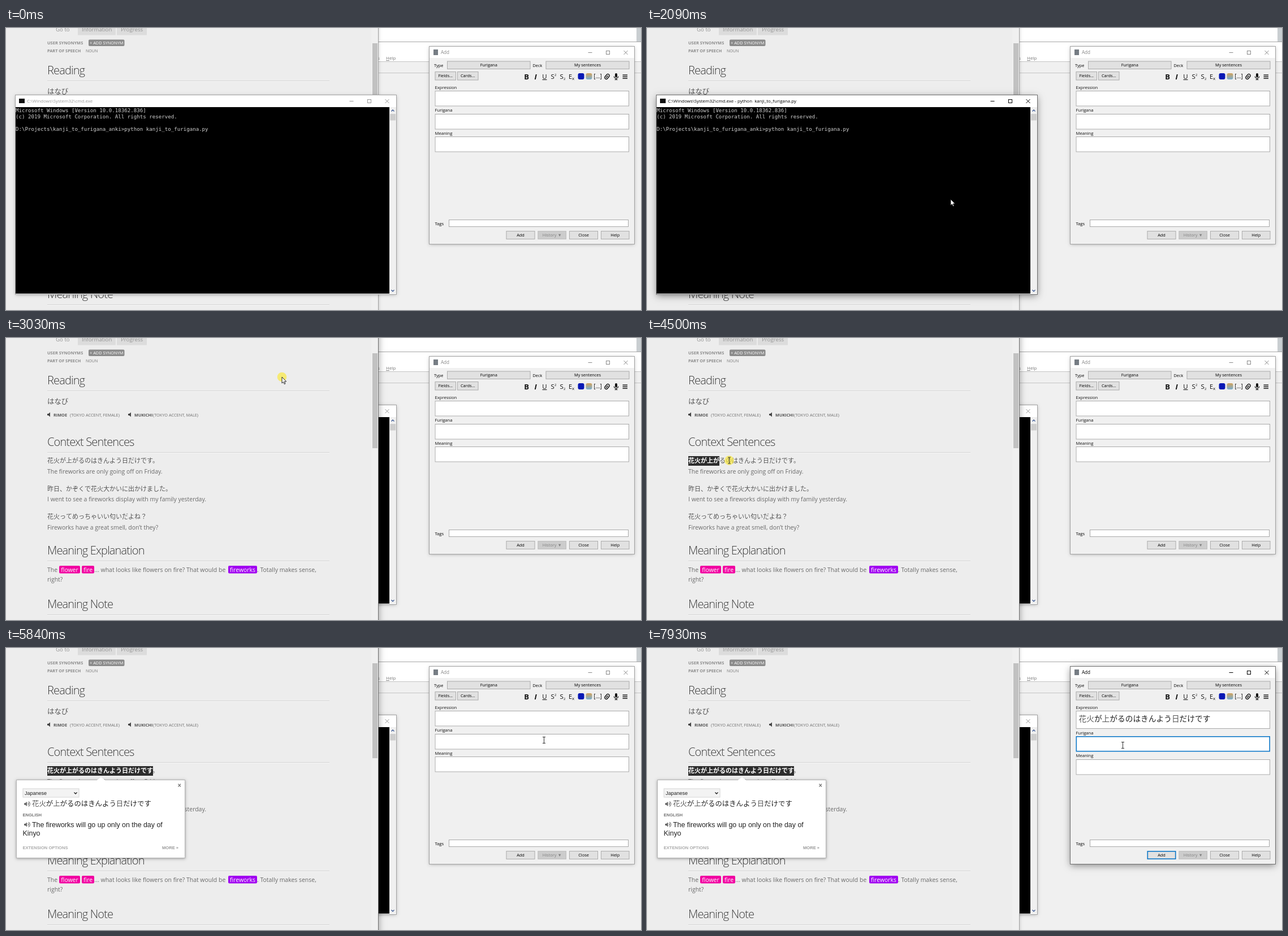
Recreate the animation shown at these times as an HTML page with a canvas. Size 1123 by 499 pixels, loop 8 s.

```html
<!DOCTYPE html>
<html lang="en">
<head>
<meta charset="utf-8">
<title>Adding a card</title>
<style>
html, body { margin: 0; width: 100%; height: 100%; overflow: hidden; background: #f0f0f0; }
canvas { display: block; width: 1123px; height: 499px; }
</style>
</head>
<body>
<canvas id="stage" width="1123" height="499"></canvas>
<script>
const ctx = document.getElementById('stage').getContext('2d');
const LOOP = 8000;
const UI = '"Open Sans", sans-serif';
const ARIAL = '"Liberation Sans", Arial, sans-serif';
const MONO = '"DejaVu Sans Mono", monospace';
const CJK = '"Noto Sans CJK JP", "Noto Sans CJK", sans-serif';
const SENTENCE = '花火が上がるのはきんよう日だけです';
const BLUE = '#0f78c8';

// Cursor path: time, x, y, optional easing
const smooth = u => u * u * (3 - 2 * u);
const easeOut = u => 1 - (1 - u) ** 1.55;
const PATH = [
  [130, 1030, 512], [530, 537, 302], [770, 537, 303], [2320, 537, 303],
  [2490, 537, 304], [2640, 537, 304], [2930, 488, 69], [3200, 488, 69],
  [3640, 150, 256], [4010, 78, 218], [4330, 75, 217], [4970, 259, 216, easeOut],
  [5250, 259, 216], [5590, 928, 177], [5760, 928, 177], [5840, 951, 163],
  [6200, 900, 126], [6840, 900, 126], [7340, 841, 172]
];
const CLICKS = [[530, 610], [3025, 3090], [4330, 5120], [6210, 6300], [7370, 7550]];
const within = (t, a, b) => t >= a && t < b;

function cursorAt(t) {
  let i = PATH.findIndex(k => k[0] > t);
  if (i === 0) return PATH[0].slice(1, 3);
  if (i < 0) return PATH[PATH.length - 1].slice(1, 3);
  const [t0, x0, y0] = PATH[i - 1], [t1, x1, y1, ease = smooth] = PATH[i];
  const u = ease((t - t0) / (t1 - t0));
  return [x0 + (x1 - x0) * u, y0 + (y1 - y0) * u];
}

function rect(x, y, w, h, color) {
  ctx.fillStyle = color;
  ctx.fillRect(x, y, w, h);
}

function box(x, y, w, h, fill, border, line = 1) {
  rect(x, y, w, h, fill);
  ctx.strokeStyle = border;
  ctx.lineWidth = line;
  ctx.strokeRect(x + line / 2, y + line / 2, w - line, h - line);
}

function rounded(x, y, w, h, r, fill) {
  ctx.fillStyle = fill;
  ctx.beginPath();
  ctx.roundRect(x, y, w, h, r);
  ctx.fill();
}

function path(points, color, width = 1) {
  ctx.strokeStyle = color;
  ctx.lineWidth = width;
  ctx.beginPath();
  points.forEach(([x, y]) => ctx.lineTo(x, y));
  ctx.stroke();
}

function polygon(points, fill) {
  ctx.fillStyle = fill;
  ctx.beginPath();
  points.forEach(([x, y]) => ctx.lineTo(x, y));
  ctx.closePath();
  ctx.fill();
}

function text(s, x, y, size, color, { weight = 400, family = UI, align = 'left', spacing = 0 } = {}) {
  ctx.font = `${weight} ${size}px ${family}`;
  ctx.letterSpacing = spacing + 'px';
  ctx.textAlign = align;
  ctx.fillStyle = color;
  ctx.fillText(s, x, y);
}

function japanese(s, x, y, size) {
  [...s].forEach((c, i) => {
    const kanji = /[一-龯]/.test(c);
    text(c, x + i * size, y, size, kanji ? '#555' : '#222', { weight: kanji ? 300 : 400, family: CJK });
  });
}

function windowFrame(x, y, w, h, active) {
  ctx.save();
  ctx.shadowColor = active ? 'rgba(0,0,0,.45)' : 'rgba(0,0,0,.3)';
  ctx.shadowBlur = active ? 12 : 6;
  ctx.shadowOffsetY = active ? 3 : 1;
  rect(x, y, w, h, '#fff');
  ctx.restore();
  ctx.strokeStyle = active ? '#6e6e6e' : '#a2a2a2';
  ctx.lineWidth = 1;
  ctx.strokeRect(x - .5, y - .5, w + 1, h + 1);
}

function titleButtons(x, y, color) {
  rect(x - 3.5, y, 7, 1, color);
  ctx.strokeStyle = color;
  ctx.lineWidth = 1;
  ctx.strokeRect(x + 28.5, y - 2.5, 6, 6);
  path([[x + 59.5, y - 3], [x + 66.5, y + 4]], color);
  path([[x + 66.5, y - 3], [x + 59.5, y + 4]], color);
}

function drawBackdrop() {
  rect(0, 0, 1123, 499, '#f0f0f0');
  rect(658, 0, 457, 24, '#fff');
  rect(1115, 0, 8, 24, '#c9ced1');
  rect(658, 24, 465, 1, '#a6a6a6');
  rect(658, 25, 465, 35, '#fff');
  rect(658, 59, 465, 1, '#c4c4c4');
  rect(658, 79, 465, 1, '#c4c4c4');
  text('s', 657, 56, 8, '#777');
  text('Help', 672, 56, 8, '#777');
  rect(672, 57, 6, 1, '#888');
}

function heading(s, y) {
  text(s, 73, y, 20, '#3a3a3a', { weight: 300, spacing: -.85 });
  rect(73, y + 11, 499, 1, '#d3d3d3');
  rect(73, y + 12, 499, 1, '#f7f7f7');
}

function chip(s, x, w, color) {
  rounded(x, 403, w, 13.5, 2, color);
  text(s, x + w / 2, 413.5, 10.4, '#fff', { align: 'center' });
}

function speaker(x, y, color, waves) {
  polygon([[x, y - 1.5], [x + 2, y - 1.5], [x + 5, y - 4], [x + 5, y + 4], [x + 2, y + 1.5], [x, y + 1.5]], color);
  if (!waves) return;
  ctx.strokeStyle = color;
  ctx.lineWidth = 1.1;
  for (const r of [2.3, 4.8]) {
    ctx.beginPath();
    ctx.arc(x + 5.5, y, r, -1.1, 1.1);
    ctx.stroke();
  }
}

function voice(name, detail, x, detailX) {
  speaker(x, 135.5, '#444');
  text(name, x + 11, 138.5, 7.3, '#555', { weight: 700 });
  text(detail, detailX, 138.5, 7.37, '#707070');
}

function drawSelection(t) {
  if (t < 4330) return;
  const [x] = cursorAt(Math.min(t - 40, 4970));
  const count = Math.max(0, Math.min(17, Math.round((x - 73) / 11)));
  if (!count) return;
  rect(73, 209, count * 11, 17, '#2d2d2d');
  text(SENTENCE.slice(0, count), 73, 221, 11, '#fff', { weight: 700, family: CJK });
}

function drawPopup() {
  ctx.save();
  ctx.shadowColor = 'rgba(0,0,0,.35)';
  ctx.shadowBlur = 5;
  ctx.shadowOffsetY = 1;
  rect(18, 233, 299, 139, '#fff');
  ctx.restore();
  box(18, 233, 299, 139, '#fff', '#b4b4b4');
  polygon([[160, 234.5], [168, 228.5], [176, 234.5]], '#fff');
  path([[304.5, 240.5], [309, 245.5]], '#777', 1.2);
  path([[309, 240.5], [304.5, 245.5]], '#777', 1.2);
  box(29.5, 248.5, 100, 16, '#f3f3f3', '#d8d8d8');
  const arial = { family: ARIAL }, bold = { family: ARIAL, weight: 700 };
  text('Japanese', 33, 260, 9, '#222', arial);
  path([[120.5, 255.5], [123, 258], [125.5, 255.5]], '#222', 1.4);
  speaker(32, 276, '#666', true);
  japanese(SENTENCE, 46, 279.5, 12.4);
  text('ENGLISH', 29.5, 297.5, 7.55, '#777', bold);
  speaker(32, 312.5, '#666', true);
  text('The fireworks will go up only on the day of', 46, 316.5, 12.4, '#222', arial);
  text('Kinyo', 29.5, 332, 12.4, '#222', arial);
  text('EXTENSION OPTIONS', 29.5, 356, 7.58, '#aaa', bold);
  text('MORE »', 305, 356, 7.58, '#999', { ...bold, align: 'right' });
}

function drawPage(t, active) {
  windowFrame(-20, -20, 678, 540, active);
  rect(0, 0, 658, 499, '#ededed');
  rect(646, 0, 12, 499, '#f0f0f0');
  rect(648, 27, 9, 168, '#c1c1c1');

  rect(127, 0, 67, 12.5, '#dcdcdc');
  rect(196, 0, 53, 12.5, '#dcdcdc');
  text('Go to', 88, 6, 9.7, '#929292');
  text('Information', 134, 6, 9.6, '#929292');
  text('Progress', 203, 6, 9.7, '#929292');
  text('USER SYNONYMS', 73, 29, 7.45, '#8c8c8c', { weight: 700 });
  rounded(146, 20.5, 63.5, 11.5, 2, '#8b8b8b');
  text('+ ADD SYNONYM', 148, 29, 7.4, '#fff');
  text('PART OF SPEECH', 73, 43.3, 7.35, '#8c8c8c', { weight: 700 });
  text('NOUN', 141, 43.3, 7.1, '#777');

  heading('Reading', 82);
  text('はなび', 73, 117, 12.4, '#555', { family: CJK });
  voice('RIMOE', '(TOKYO ACCENT, FEMALE)', 73, 113);
  voice('MUKICHI', '(TOKYO ACCENT, MALE)', 216, 260);

  heading('Context Sentences', 191);
  const pairs = [
    [SENTENCE + '。', 'The fireworks are only going off on Friday.'],
    ['昨日、かぞくで花火大かいに出かけました。', 'I went to see a fireworks display with my family yesterday.'],
    ['花火ってめっちゃいい匂いだよね？', 'Fireworks have a great smell, don’t they?']
  ];
  pairs.forEach(([ja, en], i) => {
    const y = 221 + i * 49.6;
    text(ja, 73, y, 11, '#555', { family: CJK });
    text(en, 73, y + 18.8, 10.46, '#6a6a6a');
  });

  heading('Meaning Explanation', 383);
  const body = '#6a6a6a';
  text('The', 73, 413.5, 10.46, body);
  chip('flower', 94, 37, '#f100a1');
  chip('fire', 134, 22, '#f100a1');
  text('... what looks like flowers on fire? That would be', 156.5, 413.5, 10.46, body);
  chip('fireworks', 393, 51, '#a100f1');
  text('. Totally makes sense,', 444, 413.5, 10.46, body);
  text('right?', 73, 430.5, 10.46, body);
  heading('Meaning Note', 478);

  drawSelection(t);
  if (t >= 5265) drawPopup();
}

function drawConsole(t, active) {
  windowFrame(17, 119, 673, 352, active);
  const ink = active ? '#000' : '#999';
  rect(23, 125, 10, 8, '#111');
  const running = t >= 1630 ? ' - python  kanji_to_furigana.py' : '';
  text('C:\\Windows\\System32\\cmd.exe' + running, 37, 132, 7.95, ink);
  titleButtons(611, 129, ink);

  rect(17, 140, 661, 330, '#000');
  const lines = {
    149: 'Microsoft Windows [Version 10.0.18362.836]',
    160: '(c) 2019 Microsoft Corporation. All rights reserved.',
    182: 'D:\\Projects\\kanji_to_furigana_anki>python kanji_to_furigana.py'
  };
  for (const y in lines) text(lines[y], 17, +y, 9.14, '#d0d0d0', { family: MONO });
  if (within(t, 1080, 1560)) rect(359, 182, 5, 2, '#ccc');
  if (within(t, 1560, 1630) || within(t, 2165, 2640)) rect(17, 193, 5, 2, '#ccc');

  rect(678, 140, 12, 330, '#f0f0f0');
  rect(679, 152, 10, 11.5, '#cdcdcd');
  path([[681.5, 147.5], [684, 145], [686.5, 147.5]], '#3c5a96', 1.3);
  path([[681.5, 463.5], [684, 466], [686.5, 463.5]], '#3c5a96', 1.3);
}

function button(s, x, y, w, h, { fill = '#e1e1e1', border = '#adadad', ink = '#000', line = 1 } = {}) {
  box(x, y, w, h, fill, border, line);
  text(s, x + w / 2, y + h / 2 + 2.7, 7.4, ink, { align: 'center' });
}

function drawToolbar() {
  const black = '#111', center = { align: 'center' };
  text('B', 920.5, 90.5, 13, black, { weight: 700, align: 'center' });
  text('I', 936.5, 90.5, 13, black, { weight: 'italic 700', align: 'center' });
  text('U', 952.5, 89.5, 11.5, black, center);
  rect(948.5, 91, 8, 1, black);
  text('S', 963.5, 90, 11.5, black);
  text('2', 970, 85, 6, black);
  text('S', 979.5, 90, 11.5, black);
  text('2', 986, 92, 6, black);
  text('E', 995, 90, 11, black);
  text('x', 1001, 91.5, 8, black);
  rounded(1011.5, 80, 11, 11, 3, '#0818b4');
  const blend = ctx.createLinearGradient(0, 80, 0, 91);
  blend.addColorStop(0, '#d2a35c');
  blend.addColorStop(1, '#78aed0');
  rounded(1025.5, 80, 11, 11, 3, blend);
  text('[...]', 1046.5, 89, 10, black, center);

  ctx.save();
  ctx.translate(1063, 86);
  ctx.rotate(.7);
  ctx.strokeStyle = black;
  ctx.lineWidth = 1.4;
  ctx.beginPath();
  ctx.roundRect(-2.7, -5, 5.4, 10, 2.7);
  ctx.moveTo(0, -2.5);
  ctx.lineTo(0, 3);
  ctx.stroke();
  ctx.restore();

  rounded(1077, 80, 4, 7.5, 2, black);
  ctx.strokeStyle = black;
  ctx.lineWidth = 1.2;
  ctx.beginPath();
  ctx.arc(1079, 85.5, 3.7, 0, Math.PI);
  ctx.stroke();
  rect(1078.4, 89, 1.2, 2.5, black);
  rect(1076.5, 91, 5, 1, black);
  for (const y of [82.5, 85.5, 88.5]) rect(1090.5, y, 8.5, 1.4, black);
}

function drawDialog(t, active) {
  windowFrame(749, 33, 362, 349, active);
  const ink = active ? '#000' : '#8a8a8a';
  rect(749, 53, 362, 329, '#f0f0f0');
  rect(756, 38, 8, 10, '#767d84');
  text('Add', 769, 46, 8.1, ink);
  titleButtons(1033, 43, ink);

  text('Type', 757, 69, 7.4, '#000');
  button('Furigana', 780, 58.5, 147.5, 14.5);
  text('Deck', 931.5, 69, 7.3, '#000');
  button('My sentences', 954.5, 58.5, 148, 14.5);
  button('Fields...', 758.5, 77, 37.5, 15.5);
  button('Cards...', 798, 77, 37.5, 15.5);
  drawToolbar();

  const pasted = t >= 6780;
  const shift = pasted ? 4.5 : 0;
  const focus = t >= 7370 ? 1 : active ? 0 : -1;
  const fields = [['Expression', 0], ['Furigana', 40.8 + shift], ['Meaning', 81.4 + shift]];
  fields.forEach(([label, dy], i) => {
    const focused = i === focus;
    text(label, 758.5, 107.5 + dy, 7.65, '#111');
    box(758.5, Math.round(111 + dy), 343.5, i ? 27.5 : 27.5 + shift, '#fff',
      focused ? BLUE : '#a9a9a9', focused ? 1.6 : 1);
  });
  if (pasted) japanese(SENTENCE, 763.5, 129.5, 13.7);
  if (within(t, 6250, 6780)) rect(763, 116, 1, 16, '#000');
  if (within(t, 6780, 7300)) rect(997, 117, 1, 16, '#000');
  if (within(t, 7370, 7925)) rect(763, 160, 1, 16, '#000');

  text('Tags', 758.5, 348.8, 7.6, '#000');
  box(783, 339, 318, 13, '#fff', '#a9a9a9');
  button('Add', 884.5, 359, 51, 15, active ? { border: BLUE, line: 1.6 } : {});
  button('History ▼', 940.5, 359, 50.5, 15, { fill: '#cccccc', border: '#bfbfbf', ink: '#838383' });
  button('Close', 996, 359, 51, 15);
  button('Help', 1052, 359, 50.5, 15);
}

function drawCursor(t) {
  const [x, y] = cursorAt(t);
  if (CLICKS.some(([a, b]) => within(t, a, b))) {
    ctx.fillStyle = 'rgba(250,232,50,.65)';
    ctx.beginPath();
    ctx.arc(x, y, 8.3, 0, 7);
    ctx.fill();
  }
  const overPageText = t > 3650 && x < 300;
  const overField = x > 759 && x < 1102 && y > 110 && y < 224;
  if (overPageText || overField) {
    const cx = Math.round(x) + .5;
    path([[cx, y - 5], [cx, y + 5]], '#333');
    for (const dy of [-5.5, 5.5]) path([[cx - 2.5, y + dy], [cx + 2.5, y + dy]], '#333');
    return;
  }
  ctx.save();
  ctx.translate(x, y);
  const arrow = [[0, 0], [0, 11], [2.5, 8.7], [4.3, 12.6], [6, 11.9], [4.3, 8], [7.7, 8], [0, 0]];
  polygon(arrow, '#fff');
  path(arrow, '#111', .9);
  ctx.restore();
}

function draw(t) {
  const pageFront = t >= 3025;
  const dialogActive = t >= 6215;
  drawBackdrop();
  if (pageFront) {
    drawConsole(t, false);
    drawPage(t, !dialogActive);
  } else {
    drawPage(t, false);
    drawConsole(t, t >= 540);
  }
  drawDialog(t, dialogActive);
  drawCursor(t);
}

const start = performance.now();
function tick() {
  draw((performance.now() - start) % LOOP);
  requestAnimationFrame(tick);
}
tick();
</script>
</body>
</html>
```
